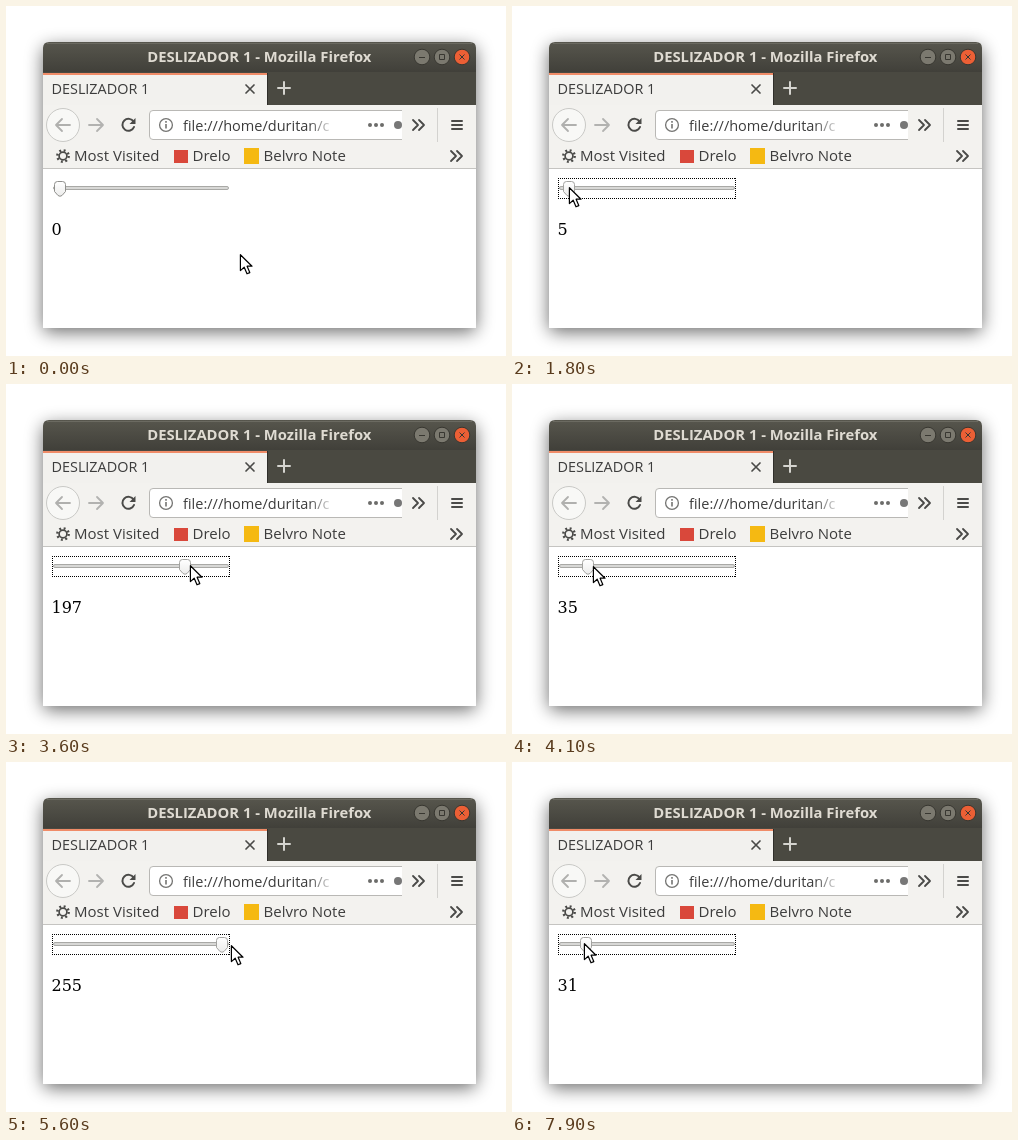
Recreate the animation shown at these times as an HTML page. Size 500x350 px, loop 8000 ms.

```html
<!DOCTYPE html>
<html lang="en">
<head>
<meta charset="utf-8">
<title>Slider demo</title>
<style>
  html, body { margin: 0; width: 100%; height: 100%; overflow: hidden; background: #fff; }
  svg { display: block; width: 500px; height: 350px; }
  text { font-family: "Open Sans", "Noto Sans", sans-serif; fill: #3c3c3c; white-space: pre; }
  .line { fill: none; stroke-linecap: round; stroke-linejoin: round; }
</style>
</head>
<body>
<svg viewBox="0 0 500 350" xmlns="http://www.w3.org/2000/svg">
  <defs>
    <linearGradient id="bar" x2="0" y2="1">
      <stop offset="0" stop-color="#57564d"/><stop offset="1" stop-color="#403f39"/>
    </linearGradient>
    <linearGradient id="knob" x2="0" y2="1">
      <stop offset="0" stop-color="#fff"/><stop offset="1" stop-color="#ececeb"/>
    </linearGradient>
    <linearGradient id="fade">
      <stop offset="0" stop-color="#fff" stop-opacity="0"/><stop offset="1" stop-color="#fff"/>
    </linearGradient>
    <filter id="blur" x="-20%" y="-20%" width="140%" height="140%">
      <feGaussianBlur stdDeviation="9"/>
    </filter>
    <clipPath id="urlClip"><rect x="140" y="100" width="256" height="38"/></clipPath>
  </defs>

  <!-- window -->
  <rect x="37" y="41" width="433" height="285" rx="6" opacity=".58" filter="url(#blur)"/>
  <path d="M37 322V42q0-6 6-6H464q6 0 6 6V322Z" fill="#fff"/>
  <path d="M37 67V42q0-6 6-6H464q6 0 6 6V67Z" fill="url(#bar)"/>
  <path d="M41 37.5H466" stroke="#6b6a61"/>
  <text x="141.2" y="56" font-size="14.8" font-weight="700" style="fill:#dfdbd2">DESLIZADOR 1 - Mozilla Firefox</text>
  <g stroke="#383731">
    <circle cx="416" cy="51" r="7.8" fill="#7b796f"/>
    <circle cx="436" cy="51" r="7.8" fill="#7b796f"/>
    <circle cx="456" cy="51" r="7.8" fill="#ec5f35"/>
    <path d="M413 51.5h6M433.5 48.5h5v5h-5ZM453.5 48.5l5 5M458.5 48.5l-5 5" fill="none"/>
  </g>

  <!-- tabs -->
  <rect x="37" y="66" width="433" height="33" fill="#4a4941"/>
  <rect x="37" y="67" width="224" height="32" fill="#f2f1ee"/>
  <rect x="37" y="67" width="224" height="2" fill="#f08c68"/>
  <path d="M261.5 67V99" stroke="#2f2e2a"/>
  <text x="45.5" y="88" font-size="14.4">DESLIZADOR 1</text>
  <path class="line" d="M240 79l8 8M248 79l-8 8" stroke="#4a4a48" stroke-width="1.7"/>
  <path class="line" d="M272 82h12M278 76v12" stroke="#d5d4cf" stroke-width="2"/>

  <!-- toolbar -->
  <rect x="37" y="99" width="433" height="63" fill="#f3f2ef"/>
  <path d="M37 162.5H470" stroke="#c5c4c1"/>
  <circle cx="57" cy="119" r="16.5" fill="#f8f8f6" stroke="#c9c9c6"/>
  <path class="line" d="M64 119H50m6-6l-6 6l6 6" stroke="#b0b0ae" stroke-width="1.8"/>
  <path class="line" d="M83 119H97m-6-6l6 6l-6 6" stroke="#b2b2b0" stroke-width="1.8"/>
  <path class="line" d="M127.6 115.8A6 6 0 1 0 128 121" stroke="#4a4a48" stroke-width="2"/>
  <path d="M129.5 112v6h-6Z" fill="#4a4a48"/>
  <g clip-path="url(#urlClip)">
    <rect x="143.5" y="104.5" width="270" height="29" rx="3.5" fill="#fff" stroke="#b9b8b5"/>
    <circle cx="392" cy="119" r="4" fill="#777"/>
  </g>
  <circle cx="160" cy="119" r="6.4" fill="none" stroke="#747472" stroke-width="1.3"/>
  <path d="M160 118v4.5M160 115v1.7" stroke="#747472" stroke-width="1.6"/>
  <text x="177" y="124.5" font-size="14.5">file:///home/duritan/c</text>
  <rect x="302" y="106" width="27" height="26" fill="url(#fade)"/>
  <g fill="#6c6c6a">
    <circle cx="364" cy="119" r="2"/><circle cx="370" cy="119" r="2"/><circle cx="376" cy="119" r="2"/>
  </g>
  <path class="line" d="M407 114l5 5l-5 5M413 114l5 5l-5 5M445 145l5 5l-5 5M451 145l5 5l-5 5" stroke="#4a4a48" stroke-width="1.8"/>
  <path d="M431.5 102V136" stroke="#d3d2cf"/>
  <path class="line" d="M446 115h10M446 119h10M446 123h10" stroke="#4a4a48" stroke-width="2"/>

  <!-- bookmarks -->
  <circle cx="57" cy="150" r="5.7" fill="none" stroke="#4a4a48" stroke-width="2.4" stroke-dasharray="1.9 2.577"/>
  <circle cx="57" cy="150" r="3.9" fill="none" stroke="#4a4a48" stroke-width="1.7"/>
  <g font-size="15">
    <text x="68" y="155">Most Visited</text>
    <text x="186.5" y="155">Drelo</text>
    <text x="257.5" y="155">Belvro Note</text>
  </g>
  <rect x="168" y="144" width="14" height="13" fill="#d9483b"/>
  <rect x="238" y="142" width="15" height="16" fill="#f5b912"/>

  <!-- page -->
  <rect x="47.5" y="180.5" width="175" height="3" rx="1.5" fill="#d8d8d6" stroke="#a9a9a6"/>
  <path id="ring" d="M46 172.5H224M46 192.5H224M46.5 172V193M223.5 172V193" fill="none" stroke="#000" stroke-dasharray="1 1"/>
  <path id="thumb" d="M-5.5 178.5Q-5.5 175.5-2.5 175.5H2.5Q5.5 175.5 5.5 178.5V185.5L2 189.5Q0 191-2 189.5L-5.5 185.5Z" fill="url(#knob)"/>
  <text id="value" x="45.5" y="228.5" font-size="16" style="font-family:'DejaVu Serif',serif;fill:#000"></text>
  <path id="cursor" d="M.4 .7V16.6L4.2 13.2L7 19.8L9.8 18.6L7.1 12.2H12Z" fill="#fff" stroke="#000" stroke-width="1.2" stroke-linejoin="round"/>
</svg>
<script>
  const LOOP = 8000, STEP = 100;
  const MIN_X = 54, MAX_X = 216, MAX_VALUE = 255;
  const GRAB = 1800, REGRAB = 6500;

  const linear = p => p;
  const smooth = p => p * p * (3 - 2 * p);
  const slowDown = p => 1 - (1 - p) ** 1.8;

  // Pointer strokes: start, end, x, y, easing; it rests in between.
  const home = [234, 248];
  const strokes = [
    [400, 1100, 67, 192, smooth],
    [1200, 1600, 56, 181, smooth],
    [1700, 1800, 57, 181, linear],
    [1940, 2800, 126, 181, linear],
    [2800, 3400, 195, 181, linear],
    [3450, 4300, 63, 182, smooth],
    [4434, 5200, 221, 182, linear],
    [5500, 5600, 225, 183, linear],
    [6000, 6200, 232, 187, smooth],
    [6200, 6400, 216, 178, smooth],
    [6500, 7600, 73.7, 180, slowDown],
    [7870, 7900, 72, 181, linear]
  ];

  const [ring, thumb, value, cursor] =
    ["ring", "thumb", "value", "cursor"].map(id => document.getElementById(id));
  const clamp = (v, lo, hi) => Math.min(hi, Math.max(lo, v));

  function pointer(t) {
    let [x, y] = home;
    for (const [start, end, toX, toY, ease] of strokes) {
      const p = ease(clamp((t - start) / (end - start), 0, 1));
      x += (toX - x) * p;
      y += (toY - y) * p;
    }
    return [x, y];
  }

  // The thumb runs a little ahead of the pointer in the first drag, behind in the second.
  function thumbX(t) {
    if (t < GRAB) return MIN_X;
    return clamp(pointer(t + (t < REGRAB ? 34 : -28))[0], MIN_X, MAX_X);
  }

  function draw(now) {
    const t = Math.floor(now % LOOP / STEP) * STEP;
    const x = thumbX(t);
    cursor.setAttribute("transform", `translate(${pointer(t).map(Math.round).join(" ")})`);
    thumb.setAttribute("transform", `translate(${Math.round(x)} 0)`);
    thumb.setAttribute("stroke", t < GRAB ? "#8f8f8c" : "#a3a3a0");
    ring.setAttribute("visibility", t < GRAB ? "hidden" : "visible");
    value.textContent = Math.round((x - MIN_X) / (MAX_X - MIN_X) * MAX_VALUE);
  }

  function tick() {
    draw(performance.now());
    requestAnimationFrame(tick);
  }
  tick();
</script>
</body>
</html>
```
